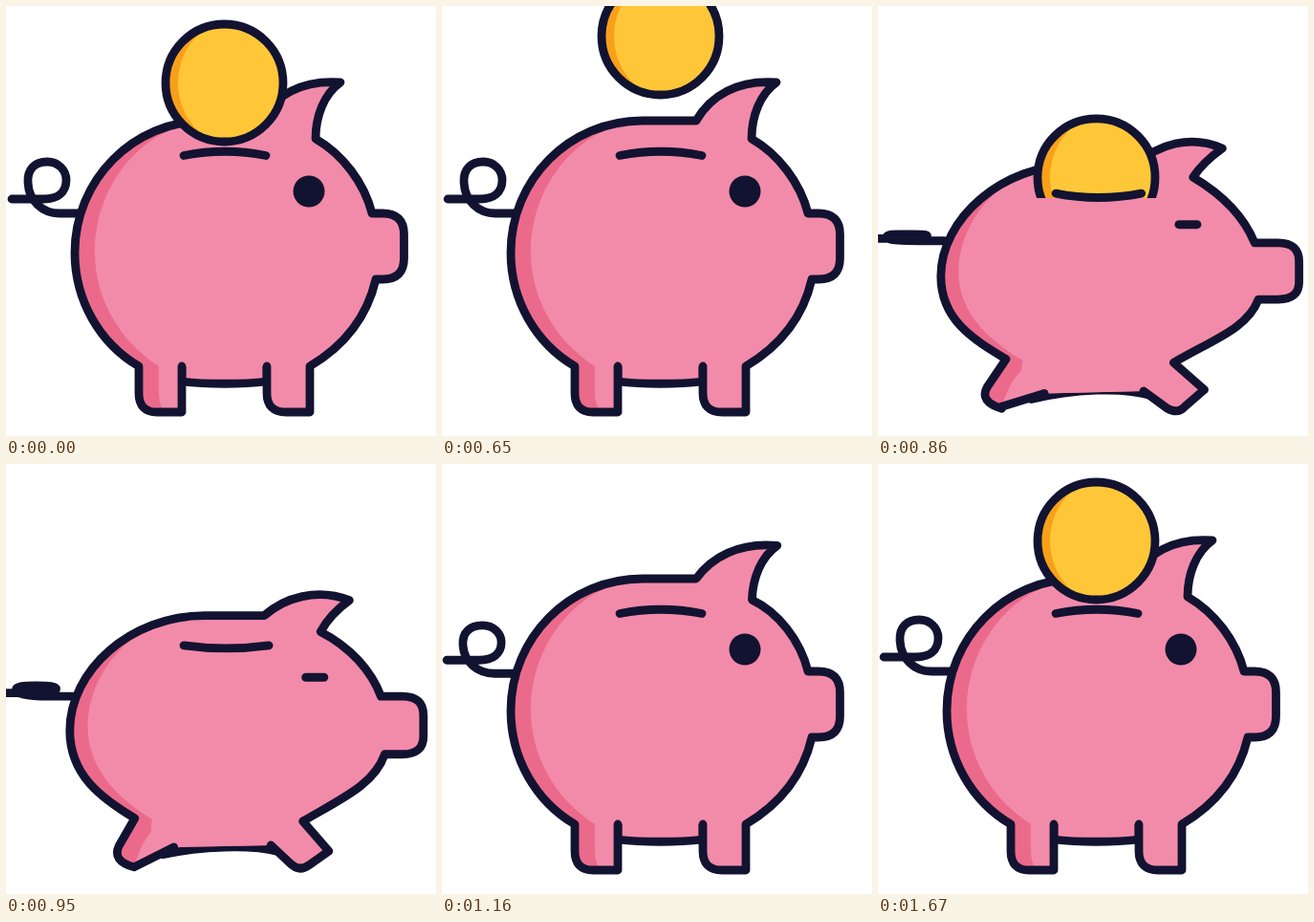
These frames come from a looping animation (450 px wide and 450 px high, 1760 ms). An HTML page:

```html
<!DOCTYPE html>
<html lang="en">
<head>
<meta charset="utf-8">
<title>Piggy bank</title>
<style>
  html, body { margin: 0; width: 100%; height: 100%; overflow: hidden; background: #fff; }
  svg { display: block; width: 100%; height: 100%; }
  .line { fill: none; stroke: #121331; stroke-width: 8.8; stroke-linecap: round; stroke-linejoin: round; }
  .light { fill: #f28ba9; }
  .dark { fill: #eb6a8b; }
</style>
</head>
<body>
<svg viewBox="0 0 450 450">
  <defs>
    <clipPath id="inBody"><path id="bodyClip"/></clipPath>
    <clipPath id="aboveSlot"><rect id="slotClip" width="450"/></clipPath>
    <clipPath id="inCoin"><circle r="61.5"/></clipPath>
  </defs>
  <path id="tail" class="line"/>
  <path id="belly" class="line" style="fill:#f28ba9"/>
  <path id="bodyFill" class="dark"/>
  <g clip-path="url(#inBody)"><path id="shine" class="light"/></g>
  <path id="outline" class="line"/>
  <rect id="eye" fill="#121331"/>
  <g clip-path="url(#aboveSlot)">
    <g id="coin">
      <circle r="61.5" fill="#f9a01b"/>
      <ellipse cx="12" rx="60.5" ry="66" fill="#ffc738" clip-path="url(#inCoin)"/>
      <circle r="61.5" class="line"/>
    </g>
  </g>
  <path id="slot" class="line"/>
</svg>
<script>
const LOOP = 1760, HOLD = 500, STEP = 30;
const COIN_REST = 80.5, COIN_INSIDE = 240;
const $ = id => document.getElementById(id);

// Each part: [resting shape, squashed shape], with the same commands in both
const shapes = {
  back: [
    'M184 377 L184 425 L158 425 Q139 425 139 405 L139 377 C98 353 72 308 72 258 C72 182 133 120 210 120 L266 120',
    'M176 400 L138 421 L135 422 Q112 416 119 400 L135 371 C100 350 67 325 67 278 C67 215 130 157 208 157 L270 157'],
  ear: [
    'C281 94 309 77 350 80 C333 92 324 115 324 139',
    'C291 138 325 127 359 140 C345 150 336 160 329 174'],
  front: [
    'C352 155 375 185 383 217 L394 217 Q416.5 217 416.5 239 L416.5 264 Q416.5 286 394 286 L387 286 C378 325 355 355 318 377 L318 425 L293 425 Q273 425 273 405 L273 377',
    'C360 190 382 215 392 242 L414 242 Q436 242 436 262 L436 284 Q436 303 414 303 L396 303 C385 335 352 350 311 374 L337 406 L316 420 Q306 427 297 418 L277 398'],
  belly: [
    'M184 365 L184 393 C210 396 247 396 273 393 L273 365 Z',
    'M176 380 L165 408 C205 400 255 398 284 405 L277 380 Z'],
  shine: [
    'M210 120 C145 125 93 185 93 258 C93 305 118 350 160 377 L160 405 Q160 418 168 430 L450 440 L450 60 L210 60 Z',
    'M185 157 C125 170 86 222 86 275 C86 320 120 352 153 372 L152 386 Q140 400 134 430 L450 440 L450 60 L185 60 Z'],
  slot: ['M186 156.5 Q229 148 272 156.5', 'M186 188.5 Q230 194 275 188.5'],
  tail: [
    'M76 217 L56 217 C38 217 24 204 23 185 C22 170 31 163 43 163 C55 163 63 172 63 182 C63 195 54 202 40 202 L6 202',
    'M70 242 L45 242 C28 242 12 240 11 235 C10 229 22 229 33 229 C45 229 53 230 53 233 C53 237 44 238 30 238 L-6 238']
};

const mix = (a, b, k) => a + (b - a) * k;
const clamp = (v, low, high) => Math.max(low, Math.min(high, v));
const hump = (t, start, length) => Math.sin(Math.PI * clamp((t - start) / length, 0, 1));

function backOut(p) {
  const u = clamp(p, 0, 1) - 1;
  return 1 + 2.7 * u ** 3 + 1.7 * u ** 2;
}

// The coin hops, drops through the slot and later pops back out.
function coinY(t) {
  if (t < HOLD) return COIN_REST;
  if (t < 1335) {
    const hop = 31 + .0018 * (t - 633) ** 2;
    const pull = .0046 * Math.max(0, t - 750) ** 2;
    return Math.min(COIN_INSIDE, hop + pull);
  }
  return mix(COIN_INSIDE, COIN_REST, backOut((t - 1335) / 287));
}

const bodySquash = t => 1.45 * hump(t, 790, 215) - .3 * hump(t, 1005, 155);
const tipSquash = t => Math.min(1.15, bodySquash(t) + .09 * hump(t, 1100, 120));

function morph(name, k) {
  const number = /-?\d+(\.\d+)?/g;
  const [rest, flat] = shapes[name];
  const ends = flat.match(number);
  let i = 0;
  return rest.replace(number, n => mix(+n, +ends[i++], k).toFixed(2));
}

function set(id, attrs) {
  for (const name in attrs) $(id).setAttribute(name, attrs[name]);
}

function draw(time) {
  const t = time < HOLD ? 0 : HOLD + Math.floor((time - HOLD) / STEP) * STEP;
  const k = bodySquash(t), tip = tipSquash(t);
  const body = morph('back', k) + morph('ear', tip) + morph('front', k);
  for (const id of ['bodyClip', 'bodyFill', 'outline']) set(id, { d: body });
  for (const id of ['belly', 'shine', 'slot']) set(id, { d: morph(id, k) });
  set('tail', { d: morph('tail', tip) });

  const blink = clamp(k, 0, 1);
  const w = mix(33, 28, blink), h = mix(33, 9, blink);
  set('eye', {
    x: mix(317, 323, k) - w / 2, y: mix(194, 222, k) - h / 2,
    width: w, height: h, rx: h / 2
  });

  const y = coinY(t);
  set('coin', {
    transform: `translate(228.5 ${y})`,
    visibility: y < COIN_INSIDE ? 'visible' : 'hidden'
  });
  set('slotClip', { height: mix(154.5, 192, k) });
}

const start = performance.now();
function tick() {
  draw((performance.now() - start) % LOOP);
  requestAnimationFrame(tick);
}
tick();
</script>
</body>
</html>
```
